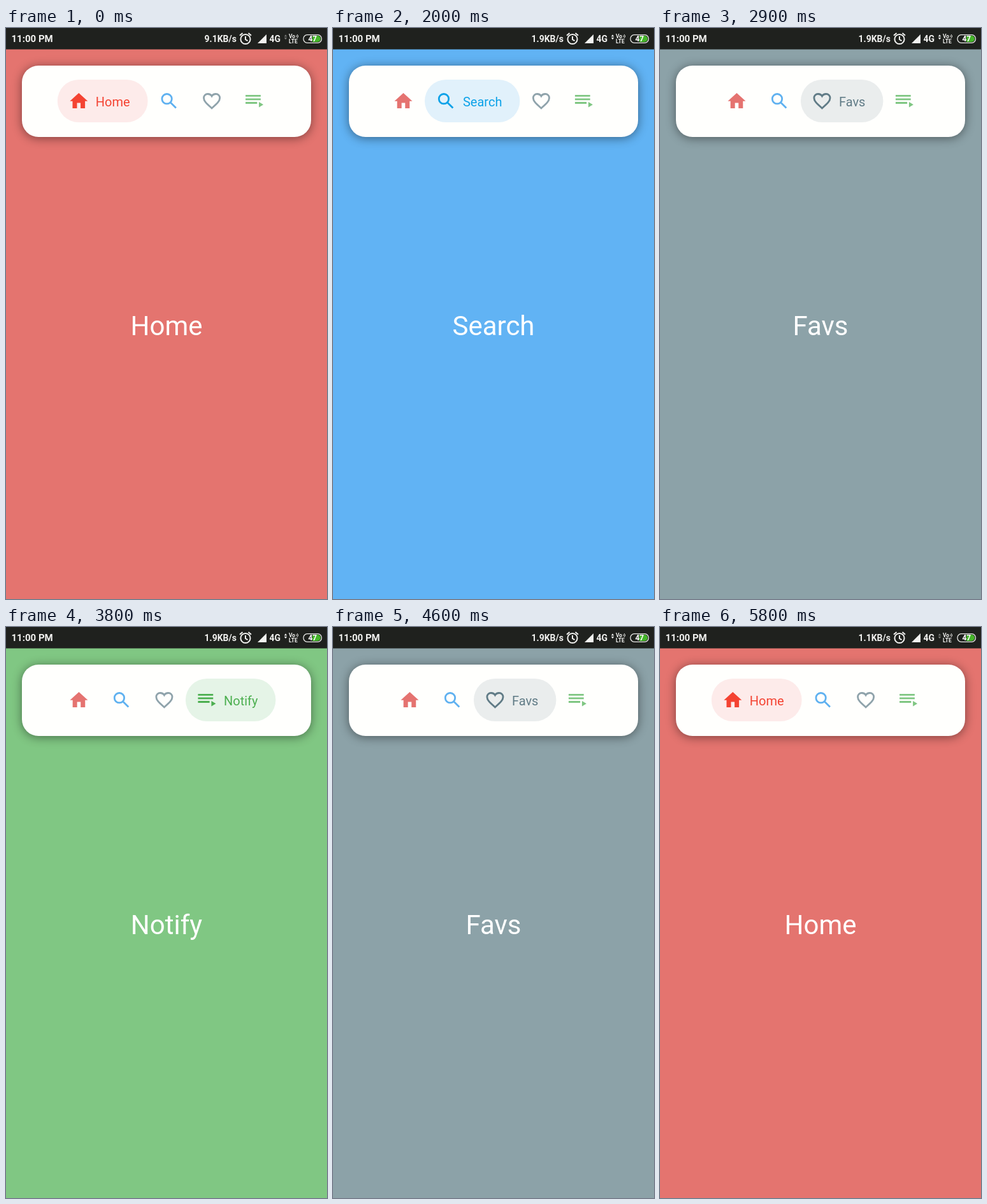
An HTML page with a canvas that plays this animation: 504x896 px, repeating every 5.9 s.

```html
<!DOCTYPE html>
<html lang="en">
<head>
<meta charset="utf-8">
<title>Tab bar</title>
<style>
  html, body { margin: 0; width: 100%; height: 100%; overflow: hidden; }
  canvas { display: block; }
</style>
</head>
<body>
<canvas id="stage" width="504" height="896"></canvas>
<script>
const ctx = document.getElementById('stage').getContext('2d');
const W = 504, H = 896, LOOP = 5900, STEP = 100;
const SLIDE = 350, EXPAND = 300;
const SLOT = 67, LABEL_X = 60, LABEL_PAD = 28, BAR_Y = 114.7;

const tabs = [
  { label: 'Home', page: '#e4746f', active: '#f44332', pill: '#fdebea', icon: '#e57370',
    path: new Path2D('M10 20V14H14V20H19V12H22L12 3L2 12H5V20Z') },
  { label: 'Search', page: '#61b3f4', active: '#0da2e8', pill: '#e1f1fb', icon: '#5fb1f0', stroke: true,
    path: new Path2D('M15 9.5A5.5 5.5 0 1 1 4 9.5A5.5 5.5 0 1 1 15 9.5M13.6 13.6L19.75 19.75') },
  { label: 'Favs', page: '#8ca2a8', active: '#607b86', pill: '#eaeded', icon: '#8fa3ab', stroke: true,
    path: new Path2D('M12 20C6 14.6 3 12 3 8.5C3 6 5 4 7.5 4C9.4 4 11.2 5 12 6.4' +
      'C12.8 5 14.6 4 16.5 4C19 4 21 6 21 8.5C21 12 18 14.6 12 20Z') },
  { label: 'Notify', page: '#80c783', active: '#4caf50', pill: '#e5f4e7', icon: '#80c783',
    path: new Path2D('M2 5H19V7H2ZM2 9H19V11H2ZM2 13H15V15H2ZM17 13V19L22 16Z') }
];

// Swipes: start time and the tab it leads to.
const swipes = [[1350, 1], [2150, 2], [2950, 3], [3854, 2], [4630, 1], [5250, 0]];

const clamp = v => Math.min(1, Math.max(0, v));
const easeInOut = u => u < 0.5 ? 4 * u ** 3 : 1 - 4 * (1 - u) ** 3;

function stateAt(t) {
  let from = 0, to = 0, start = -LOOP;
  for (const [time, tab] of swipes) {
    if (t < time) break;
    from = to;
    to = tab;
    start = time;
  }
  const slide = easeInOut(clamp((t - start) / SLIDE));
  const switchTime = start + SLIDE / 2;
  const grow = clamp((t - switchTime) / EXPAND);
  return {
    position: from + (to - from) * slide,
    selected: t >= switchTime ? to : from,
    open: tabs.map((_, i) => (i === to ? grow : 0) + (i === from ? 1 - grow : 0))
  };
}

function text(str, x, y, size, color, weight = 400, align = 'left') {
  ctx.font = `${weight} ${size}px Roboto, sans-serif`;
  ctx.textAlign = align;
  ctx.fillStyle = color;
  ctx.fillText(str, x, y);
}

function roundRect(x, y, w, h, r) {
  ctx.beginPath();
  ctx.roundRect(x, y, w, h, r);
}

function polygon(...points) {
  ctx.beginPath();
  points.forEach(([x, y]) => ctx.lineTo(x, y));
  ctx.closePath();
  ctx.fill();
}

function drawPages(position) {
  tabs.forEach((tab, i) => {
    const x = Math.round((i - position) * W);
    if (Math.abs(x) >= W) return;
    ctx.fillStyle = tab.page;
    ctx.fillRect(x, 0, W, H);
    text(tab.label, x + W / 2, 482, 42, '#fff', 400, 'center');
  });
}

function drawIcon(tab, cx, color) {
  ctx.save();
  ctx.translate(cx, BAR_Y);
  ctx.scale(1.4, 1.4);
  ctx.translate(-12, -12);
  ctx.fillStyle = ctx.strokeStyle = color;
  ctx.lineWidth = 2;
  if (tab.stroke) ctx.stroke(tab.path);
  else ctx.fill(tab.path);
  ctx.restore();
}

function drawBar({ open, selected }) {
  ctx.save();
  ctx.shadowColor = 'rgba(0,0,0,.45)';
  ctx.shadowBlur = 16;
  ctx.shadowOffsetY = 2;
  ctx.fillStyle = '#fffffd';
  roundRect(25, 59, 454, 112, 26);
  ctx.fill();
  ctx.restore();

  ctx.font = '400 20px Roboto, sans-serif';
  const widths = tabs.map((tab, i) =>
    SLOT + open[i] * (ctx.measureText(tab.label).width + LABEL_X + LABEL_PAD - SLOT));
  let x = W / 2 + 0.2 - widths.reduce((a, b) => a + b) / 2;

  tabs.forEach((tab, i) => {
    const width = widths[i], isActive = i === selected;
    if (isActive) {
      ctx.fillStyle = tab.pill;
      roundRect(x, 81, width, SLOT, SLOT / 2);
      ctx.fill();
    }
    drawIcon(tab, x + SLOT / 2, isActive ? tab.active : tab.icon);
    const visible = width - LABEL_X - LABEL_PAD;
    if (visible > 0) {
      ctx.save();
      ctx.beginPath();
      ctx.rect(x + LABEL_X, 81, visible, SLOT);
      ctx.clip();
      text(tab.label, x + LABEL_X, 122.5, 20, tab.active);
      ctx.restore();
    }
    x += width;
  });
}

function drawAlarm(x, y) {
  ctx.strokeStyle = '#f2f2f0';
  ctx.lineWidth = 2;
  ctx.beginPath();
  ctx.arc(x, y, 7.6, 0, Math.PI * 2);
  for (const side of [-1, 1]) {
    ctx.moveTo(x + side * 4.5, y - 9.5);
    ctx.lineTo(x + side * 9, y - 5.8);
  }
  ctx.moveTo(x, y - 4.5);
  ctx.lineTo(x, y + 0.5);
  ctx.lineTo(x + 3.5, y + 2.6);
  ctx.stroke();
}

function drawBattery() {
  ctx.fillStyle = '#45b52a';
  roundRect(481, 12, 13, 10, [0, 5, 5, 0]);
  ctx.fill();
  ctx.strokeStyle = '#e8e8e6';
  ctx.lineWidth = 1.3;
  roundRect(467, 10.7, 28.5, 12.6, 6);
  ctx.stroke();
  text('47', 481.3, 21.3, 12, '#fff', 700, 'center');
}

function drawStatus(t) {
  const white = '#f2f2f0';
  ctx.fillStyle = '#1f211e';
  ctx.fillRect(0, 0, W, 33.5);
  text('11:00 PM', 8.5, 22.3, 15, white, 700);
  const speed = t < 1500 ? '9.1' : t < 4700 ? '1.9' : '1.1';
  text(speed + 'KB/s', 362, 22, 14, white, 700, 'right');
  drawAlarm(376, 17.5);

  ctx.fillStyle = white;
  polygon([395, 24], [409, 10], [409, 24]);
  text('4G', 413.5, 22, 14, white, 700);

  ctx.fillStyle = t >= 1500 && t < 4700 ? white : '#777875';
  polygon([436.8, 13.5], [439, 10.3], [441.2, 13.5]);
  polygon([436.8, 15], [439, 18.2], [441.2, 15]);

  text('Vo', 444, 16, 8.5, white, 700);
  text('LTE', 444, 24, 8.5, white, 700);
  ctx.strokeStyle = white;
  ctx.lineWidth = 1;
  for (const r of [2, 4]) {
    ctx.beginPath();
    ctx.arc(454.5, 13, r, -0.8, 0.8);
    ctx.stroke();
  }
  drawBattery();
}

function frame() {
  const t = Math.floor((performance.now() % LOOP) / STEP) * STEP;
  const state = stateAt(t);
  drawPages(state.position);
  drawBar(state);
  drawStatus(t);
  requestAnimationFrame(frame);
}
frame();
</script>
</body>
</html>
```
